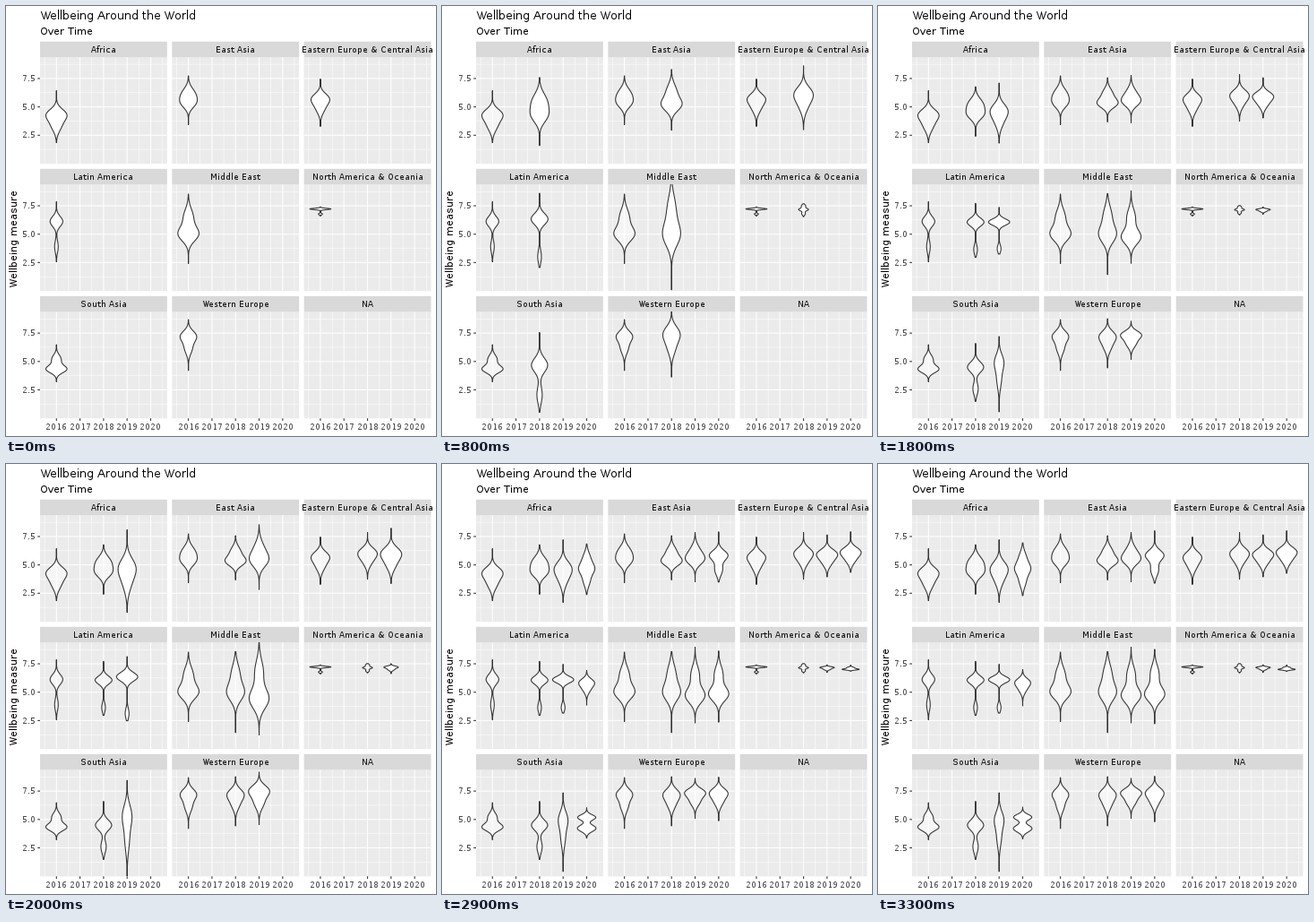
Animation, 480 px wide and 480 px high, one loop 10000 ms. Source, as a matplotlib script:

```python
import math

import matplotlib.pyplot as plt
import numpy as np
from matplotlib.animation import FuncAnimation
from matplotlib.patches import Polygon, Rectangle

plt.rcParams.update({
    "font.family": "DejaVu Sans",
    "text.hinting": "native",
    "text.hinting_factor": 1,
})

SIZE = 480
FRAMES, INTERVAL = 100, 100

# Panel layout in pixels, y pointing down
PANEL_W, PANEL_H, STRIP_H = 141.83, 118.9, 17.5
LEFT, TOP = 38.0, 57.2
COL_STEP, ROW_STEP = 147.33, 142.1
YEAR_X, YEAR_STEP = 18.3, 26.3
FIVE_Y, UNIT = 55.4, 12.67

# Surveyed years, the frame each one enters and the steps it takes
YEARS = (2016, 2018, 2019, 2020)
ENTER = (0, 6, 18, 29)
STEPS = (1, 6, 5, 5)

INK = "#333333"
LINE = 1.067

fig = plt.figure(figsize=(SIZE / 72, SIZE / 72), dpi=72, facecolor="white")
ax = fig.add_axes([0, 0, 1, 1])
ax.set(xlim=(0, SIZE), ylim=(SIZE, 0))
ax.axis("off")

shapes = []


def box(x, y, w, h, color):
    patch = Rectangle((x, y), w, h, fc=color, ec="none", lw=0, snap=False)
    return ax.add_patch(patch)


def line(x0, y0, x1, y1, color="white", width=LINE):
    ax.plot([x0, x1], [y0, y1], color=color, lw=width,
            solid_capstyle="butt", snap=False)


def label(x, y, text, size, color="black", ha="left", **kw):
    ax.text(x, y, text, size=size, color=color, ha=ha, va="baseline", **kw)


def score_y(top, score):
    return top + FIVE_Y - (score - 5) * UNIT


def year_x(left, year):
    return left + YEAR_X + (year - 2016) * YEAR_STEP


def bell(x, centre, spread):
    return np.exp(-((x - centre) / spread) ** 2 / 2)


def density(low, high, peak, *shoulders):
    """Unit-area curve: a main peak plus shoulders that weaken with distance."""
    span = high - low
    score = np.linspace(low, high, 240)
    spread = span * 0.125 - 0.1 * abs(peak - shoulders[0])
    curve = bell(score, peak, spread)
    for centre in shoulders:
        weight = math.exp(-3 * abs(peak - centre) / span)
        curve += weight * bell(score, centre, 1.2 * spread)
    return score, curve / (curve.mean() * span)


def draw_panel(col, row, name):
    left, top = LEFT + col * COL_STEP, TOP + row * ROW_STEP
    right, bottom = left + PANEL_W, top + PANEL_H
    frame = box(left, top, PANEL_W, PANEL_H, "#ebebeb")
    box(left, top - STRIP_H, PANEL_W, STRIP_H, "#d9d9d9")
    label(left + PANEL_W / 2, top - 5.2, name, 8.8, "#1a1a1a", "center")

    for score in np.arange(1.25, 9, 2.5):
        y = score_y(top, score)
        line(left, y, right, y, width=LINE / 2)
    for year in np.arange(2015.5, 2021):
        x = year_x(left, year)
        line(x, top, x, bottom, width=LINE / 2)
    for score in (2.5, 5.0, 7.5):
        y = score_y(top, score)
        line(left, y, right, y)
        if col == 0:
            line(left - 2.75, y, left, y, INK)
            label(left - 5, y + 3.2, f"{score:.1f}", 8.8, "#4d4d4d", "right")
    for year in range(2016, 2021):
        x = year_x(left, year)
        line(x, top, x, bottom)
        if row == 2:
            line(x, bottom, x, bottom + 2.75, INK)
            label(x, bottom + 12.7, str(year), 8.8, "#4d4d4d", "center")
    return left, top, frame


def panel(col, row, name, *violins):
    """One facet; a violin per year is (low, high, peak, *shoulders)."""
    left, top, frame = draw_panel(col, row, name)
    curves = [density(*violin) for violin in violins]
    widest = max((curve.max() for _, curve in curves), default=1)
    for i, (score, curve) in enumerate(curves):
        half = 0.45 * YEAR_STEP * curve / widest
        x, y = year_x(left, YEARS[i]), score_y(top, score)
        outline = np.column_stack([
            np.concatenate([x - half, x + half[::-1]]),
            np.concatenate([y, y[::-1]]),
        ])
        patch = Polygon(outline, closed=True, ec=INK, lw=LINE,
                        joinstyle="round", zorder=5)
        ax.add_patch(patch)
        patch.set_clip_path(frame)
        shapes.append((patch, outline, (y[0] + y[-1]) / 2, i))


panel(0, 0, "Africa",
      (1.85, 6.43, 4.34, 3.4), (2.4, 6.77, 4.3, 5.2, 5.2),
      (1.69, 7.22, 4.75, 3.8), (2.29, 6.94, 4.65, 5.6, 3.6))
panel(1, 0, "East Asia",
      (3.43, 7.73, 5.3, 6.1, 6.1), (3.67, 7.57, 5.3, 6.15),
      (3.51, 7.85, 5.45, 6.2), (3.39, 8.01, 5.85, 4.55))
panel(2, 0, "Eastern Europe & Central Asia",
      (3.27, 7.46, 5.75, 4.95), (3.75, 7.85, 6.1, 5.4),
      (3.94, 7.65, 6.0, 5.3), (4.26, 8.01, 6.2, 5.5))
panel(0, 1, "Latin America",
      (2.57, 7.86, 6.12, 3.9), (2.96, 7.72, 6.06, 3.65),
      (3.16, 7.46, 6.1, 3.65), (3.79, 6.99, 5.9, 5.3))
panel(1, 1, "Middle East",
      (2.41, 8.53, 5.0, 6.5), (1.43, 8.57, 4.95, 6.6),
      (2.29, 8.96, 4.7, 6.5), (2.21, 8.77, 4.8, 6.6))
panel(2, 1, "North America & Oceania",
      (6.59, 7.4, 7.22, 6.77), (6.69, 7.52, 7.15, 6.89, 7.38),
      (6.73, 7.41, 7.18, 7.02), (6.82, 7.4, 7.0, 7.15))
panel(0, 2, "South Asia",
      (3.21, 6.48, 4.32, 5.2), (1.48, 6.6, 4.5, 2.6),
      (0.41, 7.35, 5.0, 3.4), (3.29, 6.09, 5.2, 4.2, 4.2, 4.2))
panel(1, 2, "Western Europe",
      (4.2, 8.69, 7.24, 6.2), (4.43, 8.77, 7.25, 6.4),
      (5.1, 8.62, 7.38, 6.6), (4.79, 8.81, 7.4, 6.6))
panel(2, 2, "NA")

label(LEFT, 15, "Wellbeing Around the World", 13.2)
label(LEFT, 32, "Over Time", 11)
label(13.5, 258.8, "Wellbeing measure", 11, ha="center",
      rotation=90, rotation_mode="anchor")


def back_out(p):
    q = 1 - p
    return 1 - (q ** 3 - q * math.sin(q * math.pi))


def draw(frame):
    current = sum(frame >= start for start in ENTER) - 1
    for patch, outline, mid, i in shapes:
        patch.set_visible(i <= current)
        if i > current:
            continue
        grow = back_out(min(1, (frame - ENTER[i] + 1) / STEPS[i]))
        points = outline.copy()
        points[:, 1] = mid + (points[:, 1] - mid) * grow
        patch.set_xy(points)
        patch.set_facecolor((1, 1, 1, 1 if i == current else 0.5))
    return [shape[0] for shape in shapes]


anim = FuncAnimation(fig, draw, frames=FRAMES, interval=INTERVAL,
                     init_func=lambda: draw(0), repeat=True, repeat_delay=0)
plt.show()
```
